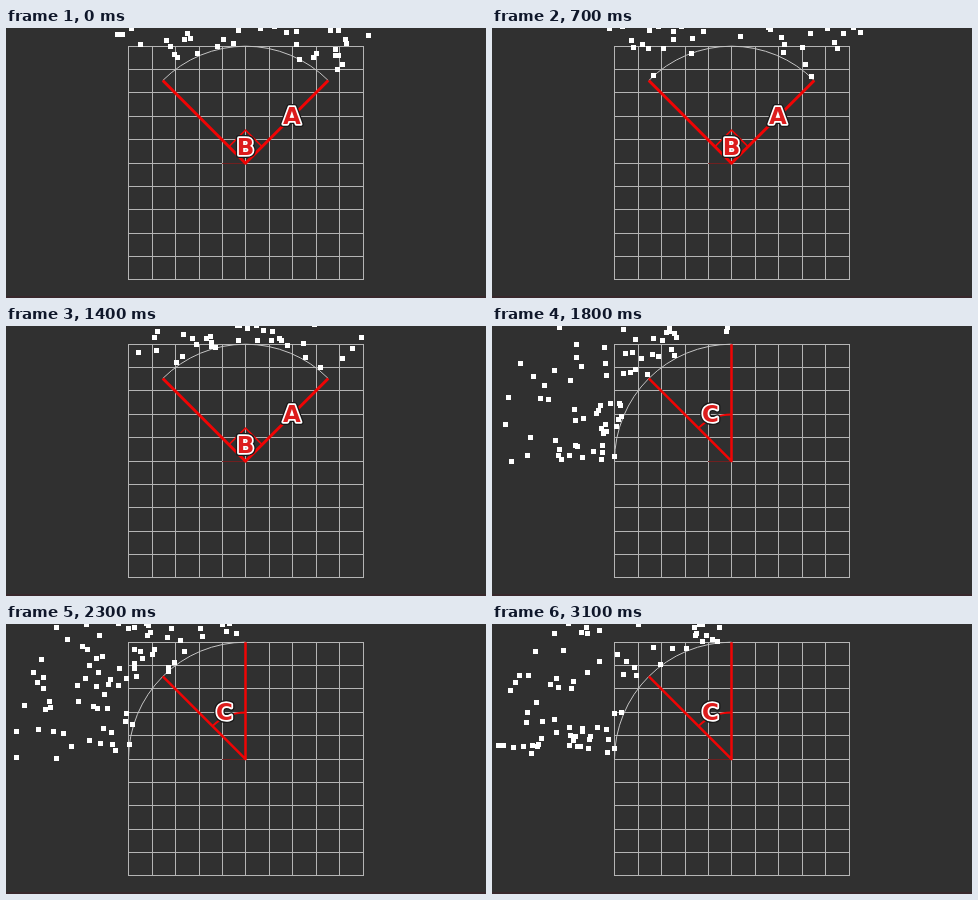
An HTML page with a canvas that plays this animation: 480x270 px, repeating every 3200 ms.

```html
<!DOCTYPE html>
<html lang="en">
<head>
<meta charset="utf-8">
<title>Random points in a sector</title>
<style>
  html, body { margin: 0; width: 100%; height: 100%; overflow: hidden; background: #303030; }
  canvas { display: block; width: 100vw; height: 100vh; }
</style>
</head>
<body>
<canvas width="480" height="270"></canvas>
<script>
const ctx = document.querySelector('canvas').getContext('2d');
const LOOP = 3200, STEP = 100, SWITCH = 1600;
const GRID = { left: 122.87, right: 357.02, top: 18.05, bottom: 251.95, cells: 10 };
const CX = 239.5, CY = 135.2, CELL = 23.4, RADIUS = 5 * CELL;
const POINTS = 105, POINT_SIZE = 5;
const RED = '#f00404';
const rad = degrees => degrees * Math.PI / 180;

// Angles run clockwise from straight up.
const polar = (degrees, r) => [CX + r * Math.sin(rad(degrees)), CY - r * Math.cos(rad(degrees))];

function seededRandom(seed) {
  return () => {
    seed = (seed + 0x6D2B79F5) | 0;
    let n = Math.imul(seed ^ (seed >>> 15), 1 | seed);
    n = (n + Math.imul(n ^ (n >>> 7), 61 | n)) ^ n;
    return ((n ^ (n >>> 14)) >>> 0) / 4294967296;
  };
}

function path(points, color, width) {
  ctx.beginPath();
  points.forEach(p => ctx.lineTo(...p));
  ctx.strokeStyle = color;
  ctx.lineWidth = width;
  ctx.stroke();
}

function arc(r, from, to, color, width) {
  ctx.beginPath();
  ctx.arc(CX, CY, r, rad(from - 90), rad(to - 90));
  ctx.strokeStyle = color;
  ctx.lineWidth = width;
  ctx.stroke();
}

function grid() {
  const { left, right, top, bottom, cells } = GRID;
  const pixel = (from, to, i) => Math.floor(from + (to - from) * i / cells);
  const x0 = pixel(left, right, 0), x1 = pixel(left, right, cells);
  const y0 = pixel(top, bottom, 0), y1 = pixel(top, bottom, cells);
  ctx.fillStyle = '#b4b4b4';
  for (let i = 0; i <= cells; i++) {
    ctx.fillRect(pixel(left, right, i), y0, 1, y1 - y0 + 1);
    ctx.fillRect(x0, pixel(top, bottom, i), x1 - x0 + 1, 1);
  }
  path([[CX - CELL, 135.5], [CX, 135.5]], '#702020', 1);
}

function label(text, x, y) {
  ctx.font = 'bold 23px "DejaVu Sans", sans-serif';
  ctx.textAlign = 'center';
  ctx.lineJoin = 'round';
  const outline = (color, width) => {
    ctx.strokeStyle = color;
    ctx.lineWidth = width;
    ctx.strokeText(text, x, y);
  };
  outline('#181818', 6);
  outline('#fff', 3.5);
  ctx.fillStyle = '#dc1c1c';
  ctx.fillText(text, x, y);
}

function scatter(from, to, seed) {
  const random = seededRandom(seed);
  ctx.fillStyle = '#fff';
  for (let i = 0; i < POINTS; i++) {
    const angle = from + (to - from) * random();
    const [x, y] = polar(angle, RADIUS * (1 + random()));
    ctx.fillRect(Math.round(x - POINT_SIZE / 2), Math.round(y - POINT_SIZE / 2), POINT_SIZE, POINT_SIZE);
  }
}

function wideSector() {
  arc(RADIUS, -45, 45, '#c4c4c4', 1);
  path([polar(-45, RADIUS), [CX, CY], polar(45, RADIUS)], RED, 3);
  path([polar(-45, CELL), [CX, CY - CELL * Math.SQRT2], polar(45, CELL)], RED, 1.5);
  label('A', 286, 95.5);
  label('B', 239.5, 127);
}

function leftSector() {
  arc(RADIUS, -90, 0, '#c4c4c4', 1);
  path([polar(-45, RADIUS), [CX, CY], polar(0, RADIUS)], RED, 2.5);
  arc(2 * CELL, -45, 0, RED, 2);
  label('C', 218.5, 96);
}

function draw(time) {
  const step = Math.floor((time % LOOP) / STEP);
  const wide = step * STEP < SWITCH;
  ctx.fillStyle = '#303030';
  ctx.fillRect(0, 0, 480, 270);
  ctx.fillStyle = '#38282c';
  ctx.fillRect(0, 268, 480, 2);
  grid();
  if (wide) wideSector(); else leftSector();
  scatter(wide ? -45 : -90, wide ? 45 : 0, 100 + step);
}

function tick() {
  draw(performance.now());
  requestAnimationFrame(tick);
}
tick();
</script>
</body>
</html>
```
